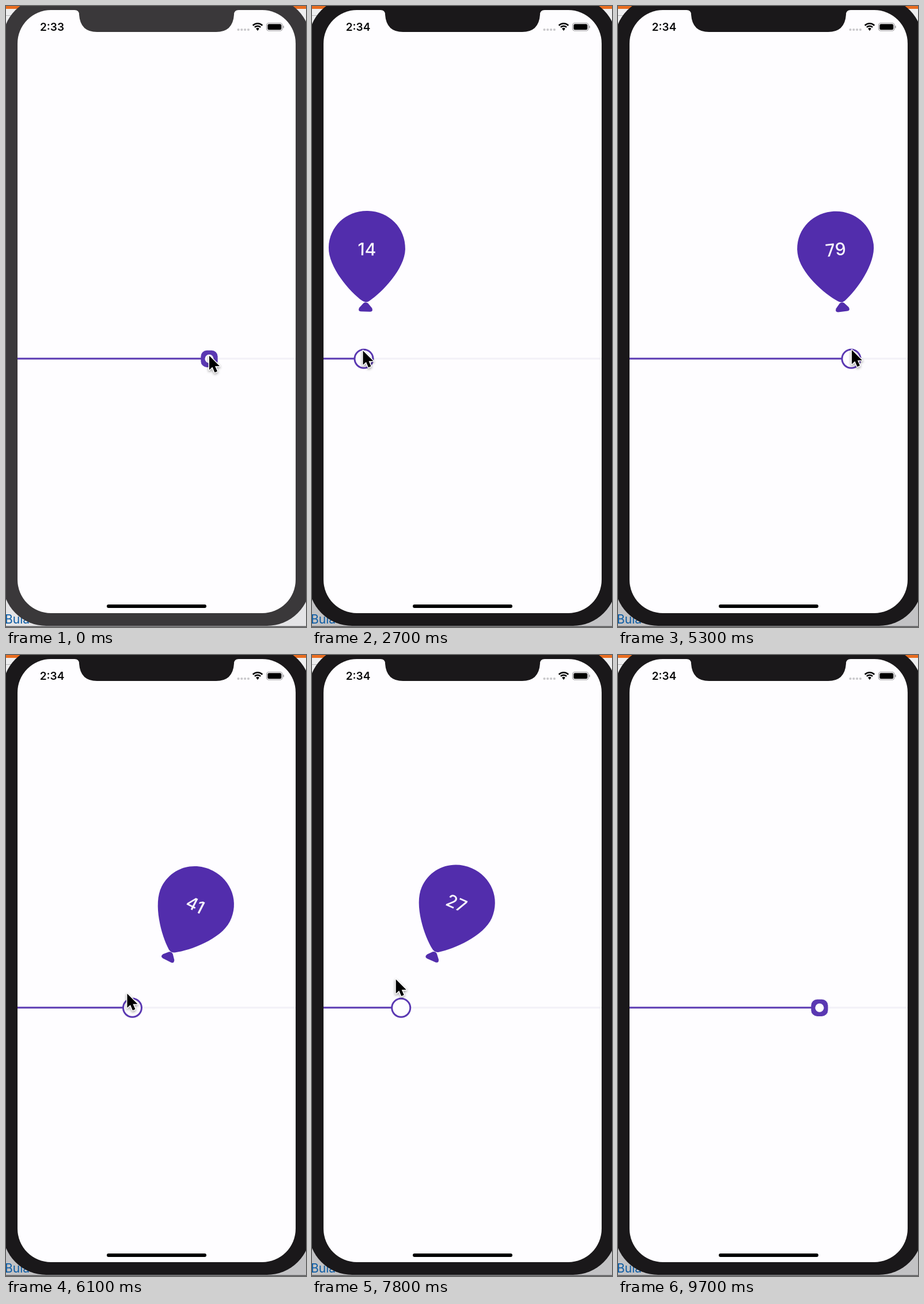
Write an HTML page with a canvas that moves like this. It is 521 px wide and 1076 px high and loops after 10 s.

```html
<!DOCTYPE html>
<html lang="en">
<head>
<meta charset="utf-8">
<title>Balloon slider</title>
<style>
  html, body { margin: 0; width: 100%; height: 100%; overflow: hidden; }
  canvas { display: block; width: 521px; height: 1076px; }
</style>
</head>
<body>
<canvas id="stage" width="521" height="1076"></canvas>
<script>
const ctx = document.getElementById('stage').getContext('2d');

const LOOP = 10000, STEP = 100, LAST_STEP = 9700;
const FOCUS_AT = 300, PRESS_AT = 700, RELEASE_AT = 8720;
const LEFT = 20, RIGHT = 503, TRACK_Y = 611, KNOT_Y = 526;
const TILT = 0.44 * Math.PI / 180;
const BALLOON = '#522dac', ACCENT = '#5a38b2', SCREEN = '#fefdff';

// [ms, knob x, balloon offset from the knob]
const drag = [
  [0, 353, 0], [1250, 353, 0], [1500, 325, 19], [1900, 215, 65],
  [2200, 140, 52], [2500, 96, 20], [2700, 90, 3], [3000, 175, -55],
  [3300, 310, -62], [3500, 355, -30], [3650, 363, -12], [3800, 363, -3],
  [4050, 363, 0], [4250, 333, 18], [4500, 235, 50], [4600, 180, 36],
  [4750, 160, 0], [4900, 225, -40], [5050, 350, -58], [5150, 398, -38],
  [5300, 405, -15], [5500, 405, -2], [5600, 405, 0], [5750, 380, 23],
  [6000, 270, 62], [6250, 150, 60], [6400, 110, 28], [6500, 115, -5],
  [6650, 225, -65], [6800, 357.7, -72], [6950, 404, -42], [7150, 410, -8],
  [7250, 408, 2], [7400, 375, 24], [7600, 275, 62], [7800, 154.7, 54],
  [7930, 108, 26], [8000, 100, 0], [8150, 190, -60], [8350, 330, -55],
  [8450, 349, -34], [8600, 350, -10], [8700, 350, -1]
];

// [ms, cursor tip y]
const cursorPath = [
  [0, 606], [1500, 605], [2200, 597], [3300, 598], [3650, 609], [4050, 609],
  [4500, 597], [5300, 596], [6800, 575], [7800, 562], [8700, 572],
  [9100, 560], [9600, -40]
];

const clamp = (v, lo, hi) => Math.min(hi, Math.max(lo, v));
const mix = (a, b, p) => a + (b - a) * p;
const ease = p => p * p * (3 - 2 * p);

// Monotone cubic interpolation of one column of a key list.
function sample(keys, t, col) {
  const last = keys.length - 1;
  if (t <= keys[0][0]) return keys[0][col];
  if (t >= keys[last][0]) return keys[last][col];
  const slope = i => (keys[i + 1][col] - keys[i][col]) / (keys[i + 1][0] - keys[i][0]);
  const tangent = i => {
    if (i === 0 || i === last) return 0;
    const a = slope(i - 1), b = slope(i);
    return a * b <= 0 ? 0 : 2 * a * b / (a + b);
  };
  const i = keys.findIndex(k => k[0] > t) - 1;
  const span = keys[i + 1][0] - keys[i][0];
  const u = (t - keys[i][0]) / span, v = 1 - u;
  return keys[i][col] * (1 + 2 * u) * v * v + tangent(i) * span * u * v * v +
    keys[i + 1][col] * u * u * (3 - 2 * u) - tangent(i + 1) * span * u * u * v;
}

function box(x, y, w, h, color, r = 0) {
  ctx.fillStyle = color;
  ctx.beginPath();
  ctx.roundRect(x, y, w, h, r);
  ctx.fill();
}

function disc(x, y, r, color) {
  ctx.fillStyle = color;
  ctx.beginPath();
  ctx.arc(x, y, r, 0, Math.PI * 2);
  ctx.fill();
}

function label(text, x, y, font, color, align = 'center') {
  ctx.font = font;
  ctx.fillStyle = color;
  ctx.textAlign = align;
  ctx.fillText(text, x, y);
}

function drawPhone(focused) {
  const bezel = focused ? '#1a181a' : '#3a383a';
  box(0, 0, 521, 1076, focused ? '#c2c2c4' : '#e4e4e6');
  box(0, 0, 521, 40, '#eeeeef');
  box(0, 0, 521, 5, '#e96d20');
  box(0, 16, 20, 1, '#b5b5b7');
  label('Bula', -2, 1069.5, '21px Inter, sans-serif', '#0b5ca5', 'left');
  box(0, 1074.5, 521, 1.5, '#59595b');
  box(-6, -15, 535, 1089, bezel, 76);
  box(LEFT, 7, RIGHT - LEFT, 1045, SCREEN, 58);

  ctx.fillStyle = bezel;
  ctx.fill(new Path2D('M119 6V7Q127 7 127 15Q129 45 158 45H365Q394 45 396 15Q396 7 404 7V6Z'));
  box(175, 1037, 173, 6, '#000', 3);
}

function drawStatus(focused) {
  label(focused ? '2:34' : '2:33', 80, 43, '600 19px Inter, sans-serif', '#0b0b0c');
  for (let i = 0; i < 4; i++) disc(403.5 + i * 5.8, 41, 2.1, '#c9c8cb');

  ctx.strokeStyle = '#000';
  ctx.lineWidth = 2.6;
  for (const r of [7.2, 11.7]) {
    ctx.beginPath();
    ctx.arc(437, 42, r, -Math.PI * 0.75, -Math.PI * 0.25);
    ctx.stroke();
  }
  ctx.fillStyle = '#000';
  ctx.beginPath();
  ctx.moveTo(437, 43);
  ctx.arc(437, 42, 4, -Math.PI * 0.75, -Math.PI * 0.25);
  ctx.fill();

  ctx.strokeStyle = '#9b9a9d';
  ctx.lineWidth = 1.2;
  ctx.beginPath();
  ctx.roundRect(452.5, 29.5, 27.5, 13.5, 4);
  ctx.stroke();
  box(454.3, 31.2, 24, 10, '#000', 2.5);
  box(481.2, 34, 1.5, 4.5, '#9b9a9d', 1);
}

function drawSlider(x, press) {
  box(LEFT, TRACK_Y - 1.5, RIGHT - LEFT, 3, '#f3f1f7');
  box(LEFT, TRACK_Y - 1.5, x - LEFT, 3, ACCENT);
  const half = mix(14.6, 17.5, press);
  box(x - half, TRACK_Y + 0.3 - half, half * 2, half * 2, ACCENT, mix(10.5, 17.5, press));
  disc(x, TRACK_Y + 0.3, mix(7.5, 14.5, press), SCREEN);
}

const body = new Path2D('M-66.5-106C-66.5-143-37-171 0-171S66.5-143 66.5-106' +
  'C66.5-72 28-30 6-15Q0-11-6-15C-28-30-66.5-72-66.5-106Z');
const knot = new Path2D('M-4-11Q0-14 4-11L11-3Q14 3 8 3.5H-8Q-14 3-11-3Z');

function drawBalloon(knobX, lag, press) {
  if (press <= 0) return;
  const value = Math.floor((knobX - LEFT) / (RIGHT - LEFT) * 100);
  ctx.save();
  ctx.translate(knobX + lag, TRACK_Y);
  ctx.scale(press, press);
  ctx.translate(0, KNOT_Y - TRACK_Y);
  ctx.rotate(lag * TILT);
  ctx.fillStyle = BALLOON;
  ctx.fill(body);
  ctx.fill(knot);
  label(value, 0, -94, '500 30px Inter, sans-serif', '#f6f3fc');
  ctx.restore();
}

const arrow = new Path2D('M0 0V24.5L5.5 19.5L9.5 29L14 27L10 18H18Z');

function drawCursor(x, y) {
  ctx.save();
  ctx.translate(x, y);
  ctx.lineJoin = 'round';
  ctx.lineWidth = 3;
  ctx.strokeStyle = '#fff';
  ctx.shadowColor = 'rgba(0,0,0,.4)';
  ctx.shadowBlur = 4;
  ctx.shadowOffsetY = 2;
  ctx.stroke(arrow);
  ctx.shadowColor = 'transparent';
  ctx.fillStyle = '#000';
  ctx.fill(arrow);
  ctx.restore();
}

function draw(t) {
  const focused = t >= FOCUS_AT;
  const press = ease(clamp((t - PRESS_AT) / 300, 0, 1)) *
    (1 - ease(clamp((t - RELEASE_AT) / 220, 0, 1)));
  const knobX = sample(drag, t, 1), lag = sample(drag, t, 2);

  drawPhone(focused);
  drawStatus(focused);
  drawSlider(knobX, press);
  drawBalloon(knobX, lag, press);
  drawCursor(knobX - clamp(lag * 0.5, -1, 9), sample(cursorPath, t, 1));
}

const start = performance.now();
function tick() {
  const t = (performance.now() - start) % LOOP;
  draw(Math.min(LAST_STEP, Math.floor(t / STEP) * STEP));
  requestAnimationFrame(tick);
}
tick();
</script>
</body>
</html>
```
